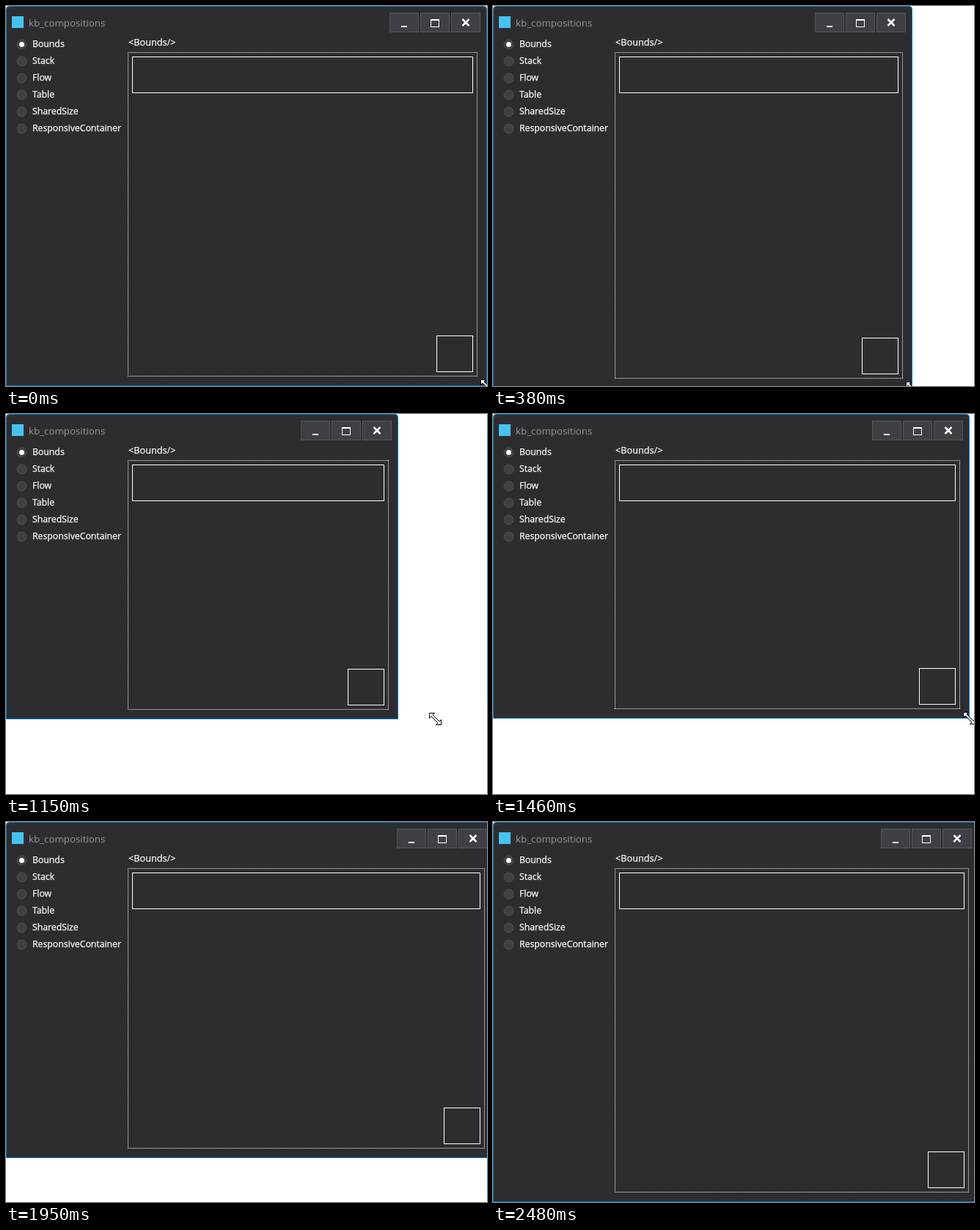
An HTML page for the animation above (2.71 s loop, 656x519 px).

```html
<!DOCTYPE html>
<html lang="en">
<head>
<meta charset="utf-8">
<title>Resizing window</title>
<style>
  html, body { margin: 0; width: 100%; height: 100%; overflow: hidden; background: #fff; }
  svg { display: block; }
  text { font-family: "Open Sans", "Noto Sans", sans-serif; font-size: 12.25px; fill: #fff; }
  .label { stroke: #fff; stroke-width: .25; }
  .title { font-size: 13.3px; fill: #999; }
  .tag { font-size: 12.7px; }
  .frame { fill: #2d2d30; stroke: #007acc; }
  .button { fill: #3f3f46; stroke: #55555c; }
  .radio { fill: #3f3f46; stroke: #4f4f55; }
  .box { fill: none; stroke: #fff; }
  .dotted { stroke-dasharray: 1 1; }
  .crisp { shape-rendering: crispEdges; }
</style>
</head>
<body>
<svg width="656" height="519" viewBox="0 0 656 519">
  <path id="frame" class="frame"/>
  <rect x="8" y="14" width="16" height="16" fill="#45c3f0"/>
  <text class="title" x="31" y="28">kb_compositions</text>
  <text class="label tag" x="167" y="54">&lt;Bounds/&gt;</text>
  <g id="options"></g>
  <path id="area" class="box dotted crisp"/>
  <rect id="bar" class="box crisp" x="172.5" y="69.5" height="49"/>
  <rect id="square" class="box crisp" x=".5" y=".5" width="49" height="49"/>
  <g id="buttons">
    <g class="button crisp">
      <rect x=".5" y="9.5" width="39" height="26"/>
      <rect x="42.5" y="9.5" width="39" height="26"/>
      <rect x="84.5" y="9.5" width="39" height="26"/>
    </g>
    <path class="crisp" fill="#fff" d="M16 27h8v2h-8z"/>
    <path class="crisp" fill="#fff" fill-rule="evenodd" d="M56 18h12v11h-12zM57 20v8h10v-8z"/>
    <path stroke="#fff" stroke-width="2.5" d="M99.5 18l9 9m0-9l-9 9"/>
  </g>
  <path id="cursor" fill="#fff" stroke="#000"
    d="M.5 .5H7.5L5 3L14 12L16.5 9.5V16.5H9.5L12 14L3 5L.5 7.5Z"/>
</svg>
<script>
const LOOP = 2710;
const REPAINT = 44;
const CURSOR_GONE = 2480;
const INITIAL = [656, 519, 0];

// Strokes of the drag: start, end, then the width, height and cursor lead reached.
const strokes = [
  [80, 380, 572, 522, 0],
  [420, 450, 534, 524, 0],
  [590, 770, 516, 451, 0],
  [810, 1070, 520, 417, 0],
  [1120, 1150, 535, 417, 51],
  [1190, 1320, 650, 416, 0],
  [1490, 1950, 666, 459, 0],
  [1990, 2200, 662, 519, 0]
];

const byId = id => document.getElementById(id);
const setAttrs = (id, attrs) => {
  for (const name in attrs) byId(id).setAttribute(name, attrs[name]);
};
const move = (id, x, y) => setAttrs(id, { transform: `translate(${x} ${y})` });

const names = ["Bounds", "Stack", "Flow", "Table", "SharedSize", "ResponsiveContainer"];
byId("options").innerHTML = names.map((name, i) => {
  const y = 23 * i;
  const dot = i ? "" : '<circle cx="21.5" cy="52.5" r="3.5" fill="#fff"/>';
  return `<circle class="radio" cx="21.5" cy="${52.5 + y}" r="6.5"/>${dot}
    <text class="label" x="36" y="${56 + y}">${name}</text>`;
}).join("");

// Each stroke advances in equal jumps, one per repaint.
function poseAt(time) {
  let pose = INITIAL;
  for (const [start, end, ...goal] of strokes) {
    if (time < start) break;
    const gaps = Math.max(1, Math.round((end - start) / REPAINT));
    const elapsed = Math.min(1, (time - start) / (end - start));
    const progress = (Math.floor(elapsed * gaps) + 1) / (gaps + 1);
    pose = pose.map((v, i) => v + (goal[i] - v) * progress);
  }
  return pose.map(Math.round);
}

function draw(time) {
  const [w, h, lead] = poseAt(time);
  const right = w - 13, bottom = h - 13;
  setAttrs("frame", {
    d: `M.5 ${h - .5}V4.5Q.5 .5 4.5 .5H${w - 4.5}Q${w - .5} .5 ${w - .5} 4.5V${h - .5}Z`
  });
  setAttrs("area", {
    d: `M166 63.5H${right}M166 ${bottom - .5}H${right}M166.5 63V${bottom}M${right - .5} 63V${bottom}`
  });
  setAttrs("bar", { width: w - 192 });
  move("square", w - 69, h - 69);
  move("buttons", w - 133, 0);
  move("cursor", w - 9 + lead, h - 9);
  setAttrs("cursor", { visibility: time >= CURSOR_GONE ? "hidden" : "visible" });
}

const start = performance.now();
function tick() {
  draw((performance.now() - start) % LOOP);
  requestAnimationFrame(tick);
}
tick();
</script>
</body>
</html>
```
